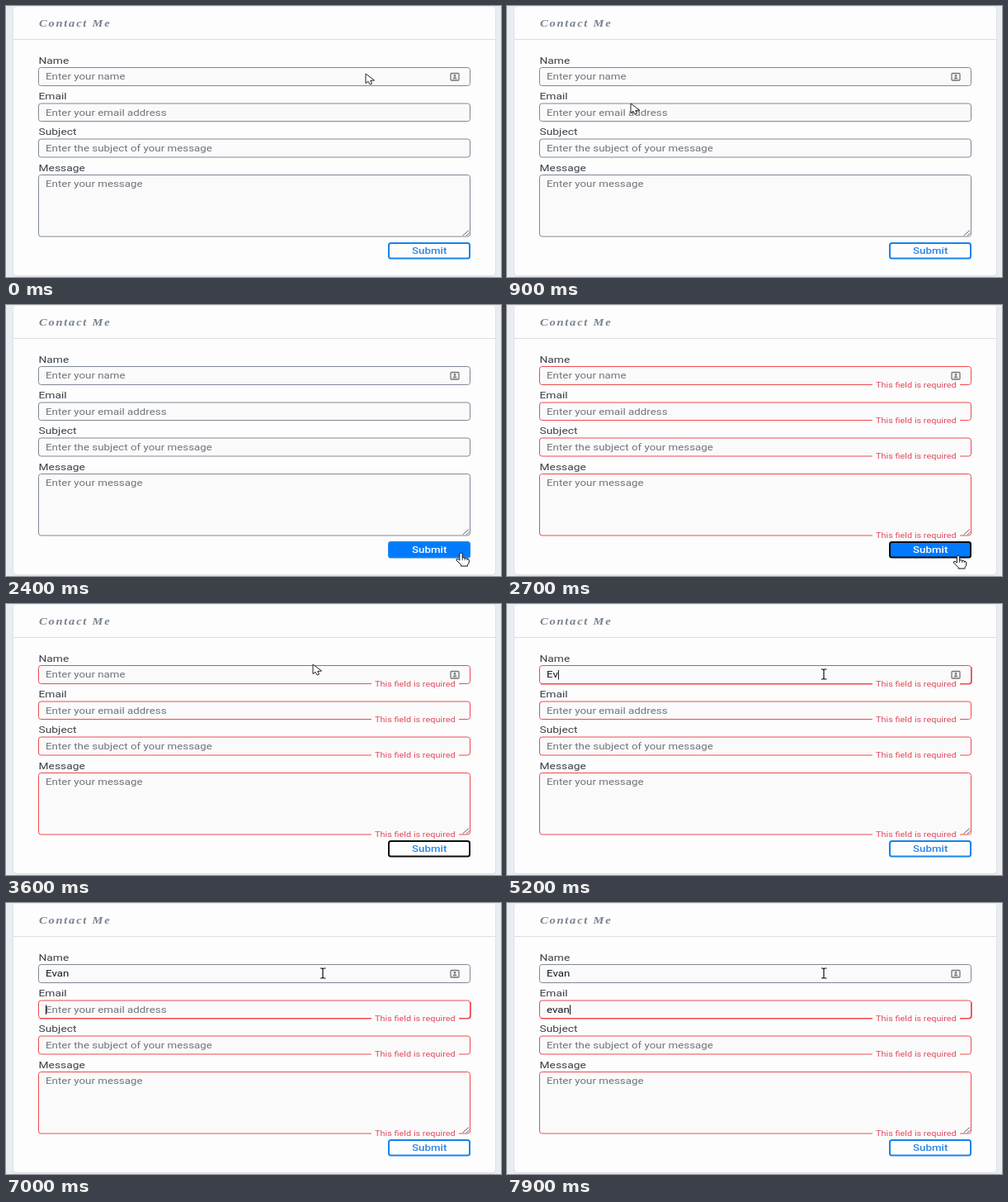
An HTML page for the animation above (8 s loop, 600 px wide and 328 px high).

```html
<!DOCTYPE html>
<html lang="en">
<head>
<meta charset="utf-8">
<title>Contact form</title>
<style>
  html, body { margin: 0; width: 100%; height: 100%; overflow: hidden; background: #e9edf2; }
  svg { display: block; width: 600px; height: 328px; }
  text { font-family: Roboto, sans-serif; white-space: pre; }
  .title { font: italic bold 12px "Liberation Serif", serif; letter-spacing: 1.44px; }
</style>
</head>
<body>
<svg id="stage" viewBox="0 0 600 328"></svg>
<script>
const stage = document.getElementById('stage');
const pen = document.createElement('canvas').getContext('2d');
const LOOP = 8000, STEP = 100;
const WIDE = 1.214; // the page is shown wider than tall
const RED = '#ee4a4d', GREY = '#7f8894', BLUE = '#1683ea';
const NAME = 'Evan';

const T = { hover: 2300, invalid: 2600, leave: 3000, focus: 3900, tab: 5900 };
const nameKeys = [4800, 5100, 5300, 5500];
const mailKeys = [7300, 7500, 7700, 7900];

const fields = [
  { label: 'Name', hint: 'Enter your name', y: 74.5, h: 22 },
  { label: 'Email', hint: 'Enter your email address', y: 118, h: 21.5 },
  { label: 'Subject', hint: 'Enter the subject of your message', y: 161, h: 22 },
  { label: 'Message', hint: 'Enter your message', y: 204.5, h: 74.5 }
];

// time, x, y of the pointer's hot spot
const route = [
  [0, 436, 82], [400, 330, 100], [900, 150, 118], [1200, 82, 170],
  [1500, 330, 255], [1700, 575, 282], [1900, 574, 276], [2300, 556, 297],
  [2500, 547, 303], [2900, 547, 303], [3300, 440, 170],
  [3600, 372, 73], [3800, 384, 85], [8000, 384, 85]
];

const text = (x, y, size, fill, str, attrs = '') =>
  `<text transform="translate(${x} ${y}) scale(${WIDE} 1)" font-size="${size}" fill="${fill}" ${attrs}>${str}</text>`;
const rect = (x, y, w, h, attrs) =>
  `<rect x="${x}" y="${y}" width="${w}" height="${h}" ${attrs}/>`;
const path = (d, attrs) => `<path d="${d}" ${attrs}/>`;
const typed = (word, keys, t) => word.slice(0, keys.filter(k => k <= t).length);

function pointerAt(t) {
  const i = route.findIndex(p => p[0] > t);
  const [t0, x0, y0] = route[i - 1], [t1, x1, y1] = route[i];
  const k = (t - t0) / (t1 - t0), e = k * k * (3 - 2 * k);
  return [x0 + (x1 - x0) * e, y0 + (y1 - y0) * e];
}

function card() {
  return rect(0, 0, 600, 328, 'fill="#e9edf2"') +
    rect(8, 1, 586, 326.5, 'rx="5" fill="#dde1e7"') +
    rect(9, 1, 584, 325, 'rx="4" fill="#fdfdfe"') +
    path('M9 40.5H593', 'stroke="#dddbe4"') +
    text(40, 24.5, 12, '#79828e', 'Contact Me', 'class="title"');
}

function caret(f, value, keys, t) {
  const last = Math.max(f.since, ...keys.filter(k => k <= t));
  if ((t - last) % 1000 >= 500) return '';
  pen.font = '11px Roboto, sans-serif';
  const x = 48.5 + pen.measureText(value).width * WIDE;
  return path(`M${x} ${f.y + 5.5}v11.5`, 'stroke="#111"');
}

function field(f, i, t) {
  const keys = [nameKeys, mailKeys][i] || [];
  const value = typed([NAME, NAME.toLowerCase()][i] || '', keys, t);
  const focused = i === 0 ? t >= T.focus && t < T.tab : i === 1 && t >= T.tab;
  const invalid = t >= T.invalid && !(i === 0 && t >= T.tab);
  const bottom = f.y + f.h;
  let out = text(39.5, f.y - 5, 11.4, '#3c4046', f.label) +
    rect(39.5, f.y, 523, f.h, `rx="3" fill="#fafafb" stroke="${invalid ? RED : GREY}"`);
  if (focused && invalid)
    out += path(`M41 ${bottom + .3}H560q3 0 3 -3V${f.y + 2}`, `fill="none" stroke="${RED}" stroke-width="1.6"`);
  out += text(48, f.y + 14.7, 11, value ? '#15181c' : '#70757b', value || f.hint);
  if (i === 0) out += icon();
  if (i === 3) out += path('M553.5 278L561 271.5M558 278L561.5 275', 'stroke="#666"');
  if (invalid)
    out += rect(443, bottom - 2, 106, 4, 'fill="#fdfdfe"') +
      text(447, bottom + 3.2, 9, '#e0485a', 'This field is required');
  if (focused) out += caret({ ...f, since: i ? T.tab : T.focus }, value, keys, t);
  return out;
}

function icon() {
  return rect(539, 81.5, 10, 8.5, 'rx="1" fill="#f4f4f4" stroke="#777" stroke-width="1.3"') +
    '<circle cx="544" cy="84.4" r="1.3" fill="#777"/>' +
    path('M541.5 88.3q0 -2 2.5 -2t2.5 2z', 'fill="#777"');
}

function button(t) {
  const hover = t >= T.hover && t < T.leave;
  const edge = t >= T.invalid && t < T.focus ? '#0b0d10' : BLUE;
  return rect(464, 287, 98, 18.5, `rx="2.5" fill="${hover ? '#007bff' : '#fdfdfe'}" stroke="${edge}" stroke-width="2"`) +
    text(492, 300, 11, hover ? '#fff' : '#2a87e6', 'Submit', 'font-weight="500"');
}

function pointer(t) {
  const [x, y] = pointerAt(t);
  let shape;
  if (t >= 3800)
    shape = path('M-3 -6H-1L0 -5L1 -6H3.5M0 -5V5M-3 6H-1L0 5L1 6H3.5', 'fill="none" stroke="#111" stroke-width="1.2"');
  else if (t >= T.hover && t < T.leave)
    shape = path('M-1.7 1Q0 -1 1.7 1V6Q3.3 5 4.7 6.5Q6.3 5.7 7.3 7.2Q9.6 6.6 9.8 9V11Q9.5 13 8 14.5V16H0V14.5L-5.5 9Q-6 7 -3.8 7.3L-1.7 9Z',
      'fill="#fff" stroke="#111" stroke-linejoin="round"') +
      path('M1.7 6V9M4.7 6.5V9M7.3 7.2V9', 'stroke="#111" stroke-width=".8"');
  else
    shape = path('M0 0V11.5L3 9.3L5.2 13L7.6 12L5.7 8.5L10.5 8Z', 'fill="#fff" stroke="#222" stroke-linejoin="round"');
  return `<g transform="translate(${x.toFixed(1)} ${y.toFixed(1)})">${shape}</g>`;
}

let shown = -1;
function draw() {
  const t = Math.floor(performance.now() % LOOP / STEP) * STEP;
  if (t !== shown) {
    shown = t;
    stage.innerHTML = card() + fields.map((f, i) => field(f, i, t)).join('') + button(t) + pointer(t);
  }
  requestAnimationFrame(draw);
}
draw();
</script>
</body>
</html>
```
